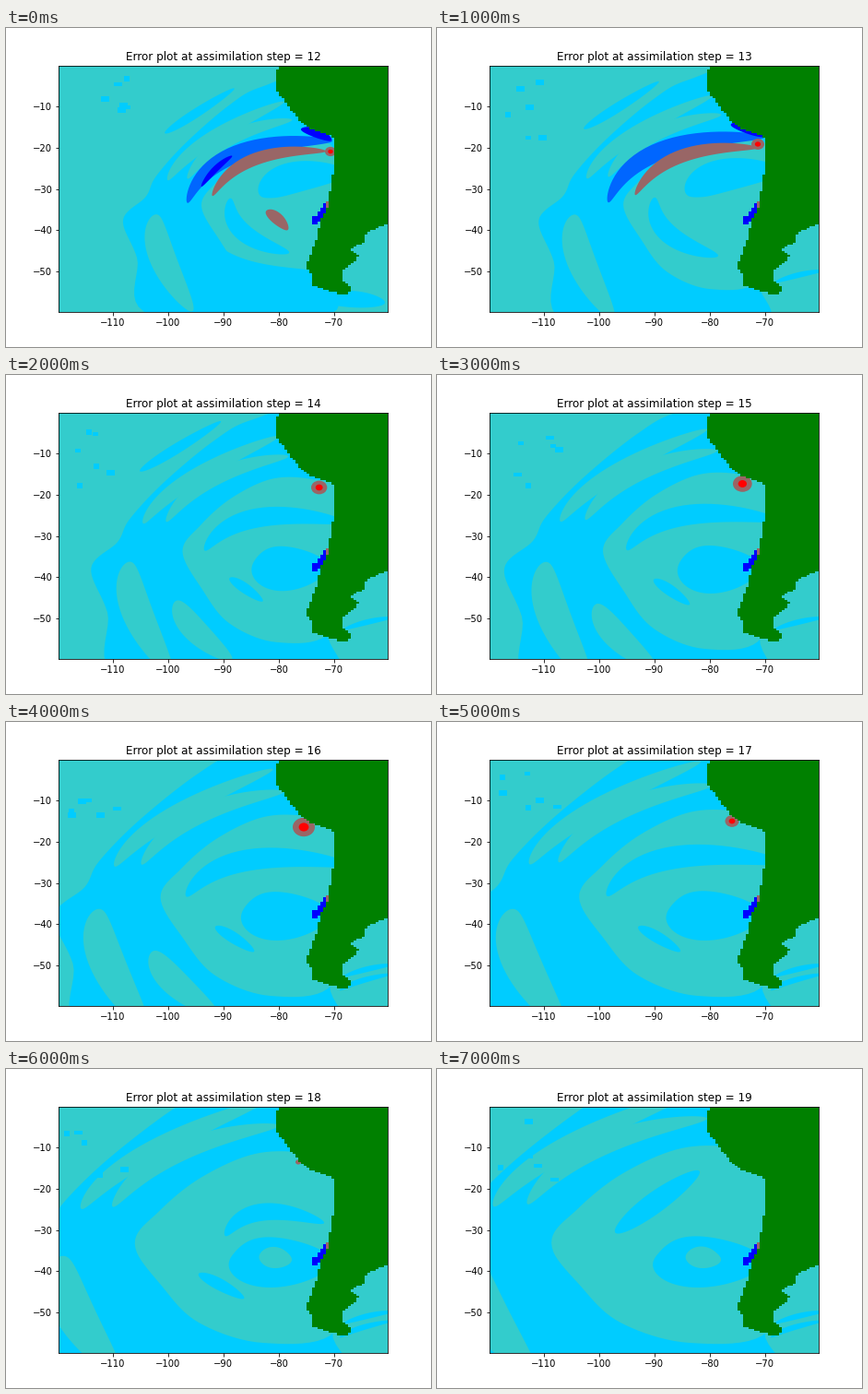
A matplotlib script that plays this animation: 461 by 346 pixels, repeating every 8000 ms.

```python
import matplotlib.pyplot as plt
import numpy as np
from matplotlib.animation import FuncAnimation
from matplotlib.colors import ListedColormap
from matplotlib.patches import Ellipse, Polygon
from matplotlib.path import Path

W, H = 461, 346
LEFT, RIGHT, TOP, BOTTOM = 57.3, 414.4, 41.45, 307.6
TEAL, CYAN, BLUE, NAVY = "#33cccc", "#00ccff", "#0066ff", "#0000ff"
BROWN, RED, LAND = "#996666", "#ff0000", "#008000"
FIRST, LAST, REF = 12, 19, 15
SOURCE = np.array([335, 200])  # the waves spread from here
GROWTH = 1.08                  # spread per step

fig = plt.figure(figsize=(6.4028, 4.8056), dpi=72)
ax = fig.add_axes([LEFT / W, 1 - BOTTOM / H, (RIGHT - LEFT) / W, (BOTTOM - TOP) / H])
ax.set_facecolor(TEAL)
ax.set(xlim=(-119.75, -60.25), ylim=(-59.75, -0.25))
ax.set_xticks(range(-110, -60, 10))
ax.set_yticks(range(-50, 0, 10))
title = ax.set_title("")
shapes = []


def degrees(xy):
    """Stage pixels to longitude and latitude."""
    x, y = np.asarray(xy, float).T
    return np.c_[-119.75 + 59.5 * (x - LEFT) / (RIGHT - LEFT),
                 -0.25 - 59.5 * (y - TOP) / (BOTTOM - TOP)]


def spread(xy, step):
    """Carry an outline from the reference step to another one."""
    s = GROWTH ** (step - REF)
    d = xy - SOURCE
    rise = np.where(d[:, 1] < 0, s ** 0.7, min(s, 1))
    return SOURCE + np.c_[d[:, 0] * s, d[:, 1] * rise]


def add(color, outline, first, last, moving):
    patch = ax.add_patch(Polygon(degrees(outline), fc=color, lw=0, zorder=1 + len(shapes) / 100))
    shapes.append((patch, outline, first, last, moving))


def blob(color, *points, first=FIRST, last=LAST):
    """Smooth closed curve through a few points."""
    p = np.array(points, float)
    q, before, after = np.roll(p, -1, 0), np.roll(p, 1, 0), np.roll(p, -2, 0)
    t = np.linspace(0, 1, 10, endpoint=False)[:, None, None]
    a, b = p + (q - before) / 6, q - (after - p) / 6
    curve = p * (1 - t) ** 3 + 3 * a * t * (1 - t) ** 2 + 3 * b * t**2 * (1 - t) + q * t**3
    add(color, curve.swapaxes(0, 1).reshape(-1, 2), first, last, True)


def band(color, half, start, mid, end, first=FIRST, last=LAST, moving=True):
    """Curved stroke with rounded, tapering ends."""
    t = (1 - np.cos(np.linspace(0, np.pi, 40))[:, None]) / 2
    spine = ((1 - t) * (1 - 2 * t) * np.array(start) + 4 * t * (1 - t) * np.array(mid)
             + t * (2 * t - 1) * np.array(end))
    along = np.gradient(spine, axis=0)
    normal = np.c_[-along[:, 1], along[:, 0]] / np.hypot(*along.T)[:, None]
    offset = normal * half * np.sqrt(np.abs(np.sin(np.pi * t)))
    add(color, np.vstack([spine + offset, (spine - offset)[::-1]]), first, last, moving)


def cells(color, *points, zorder):
    """Half-degree grid cells inside an outline."""
    lon, lat = np.arange(-119.75, -60, 0.5), np.arange(-59.75, 0, 0.5)
    grid = np.stack(np.meshgrid(lon, lat), -1)
    inside = Path(degrees(points)).contains_points(grid.reshape(-1, 2)).reshape(grid.shape[:2])
    ax.pcolormesh(lon, lat, np.ma.masked_equal(inside.astype(int), 0),
                  cmap=ListedColormap([color]), zorder=zorder)


# Outer waves
blob(CYAN, (73, 210), (104, 180), (118, 154), (158, 112), (217, 64), (262, 40), (345, 25),
     (362, 130), (360, 200), (350, 285), (350, 340), (112, 340), (92, 262))
band(CYAN, 6, (130, 99), (170, 75), (225, 42), last=14)
band(TEAL, 9, (134, 159), (187, 110), (293, 59))
band(TEAL, 9, (161, 157), (215, 108), (304, 82))
band(TEAL, 18, (120, 203), (125, 257), (168, 335))
band(TEAL, 14, (174, 248), (192, 280), (238, 318), first=14, last=16)

# Inner wave and what opens inside it
blob(TEAL, (180, 191), (201, 161), (237, 130), (284, 108), (330, 108), (362, 122), (362, 200),
     (352, 285), (290, 297), (235, 275), (203, 235))
band(CYAN, 20, (262, 180), (300, 157), (380, 150), last=13)
band(CYAN, 12, (220, 182), (236, 226), (300, 255), last=13)
band(CYAN, 20, (190, 240), (240, 285), (345, 285), last=12)
band(CYAN, 11, (206, 190), (265, 153), (372, 158), first=14, last=17)
band(CYAN, 26, (262, 206), (296, 211), (350, 208), first=14)
band(CYAN, 6, (235, 222), (252, 233), (274, 249), first=14, last=18)
band(CYAN, 8, (258, 184), (289, 162), (343, 172), first=18, last=18)
band(CYAN, 9, (231, 182), (262, 156), (298, 128), first=19)
band(TEAL, 11, (287, 203), (300, 205), (315, 208), first=18)

# Strong errors of the first steps
band(BLUE, 11, (161, 188), (224, 127), (359, 109), last=13)
band(BROWN, 8, (195, 179), (251, 133), (350, 122), last=13)
band(NAVY, 4, (180, 167), (199, 145), (222, 128), last=12)
band(NAVY, 6, (316, 94), (338, 99), (358, 108), last=13)
band(BROWN, 8, (268, 199), (283, 208), (298, 224), last=12)

# Waters east of the land
band(CYAN, 9, (335, 293), (375, 294), (411, 298), last=12, moving=False)
band(CYAN, 3, (366, 276), (392, 268), (420, 263), first=13, moving=False)
band(CYAN, 3, (362, 291), (385, 281), (420, 273), first=16, moving=False)

# Specks in the far field
rng = np.random.default_rng(4)
for step in range(FIRST, LAST + 1):
    for x, y in rng.uniform((62, 46), (130, 120), (6, 2)):
        w, h = rng.choice([6, 9]), rng.choice([4, 6])
        add(CYAN, np.array([(x, y), (x + w, y), (x + w, y + h), (x, y + h)]), step, step, False)

# Land and the steady error at its coast
cells(LAND, (297, 38), (293, 50), (293, 68), (304, 81), (317, 99), (329, 108), (356, 119),
      (356, 149), (350, 186), (342, 207), (336, 232), (325, 258), (332, 268), (332, 278),
      (345, 284), (371, 290), (375, 281), (366, 274), (366, 262), (383, 248), (372, 240),
      (387, 233), (390, 223), (416, 211), (416, 38), zorder=2)
cells(NAVY, (331, 206), (338, 202), (347, 188), (351, 190), (346, 200), (339, 211), (331, 214),
      zorder=2.2)
cells(BROWN, (346, 187), (351, 187), (351, 194), (346, 194), zorder=2.2)

hot = [ax.add_patch(Ellipse((0, 0), 1, 1, fc=c, lw=0, zorder=1.8)) for c in (BROWN, RED)]


def draw(frame):
    now = FIRST + frame
    for patch, outline, first, last, moving in shapes:
        patch.set_visible(first <= now <= last)
        if moving:
            patch.set_xy(degrees(spread(outline, now)))
    # The hot spot climbs the coast, swells and fades.
    x, y, r = (np.interp(now, (12, 13, 16, 18, 19), v) for v in (
        (352, 348, 323, 317, 317), (134, 126, 114, 101, 101), (6, 7, 12, 3, 0)))
    for patch, size in zip(hot, (r, 0.45 * r if r > 5 else 0)):
        patch.set(center=degrees([(x, y)])[0], width=size / 3, height=size * 0.38)
    title.set_text(f"Error plot at assimilation step = {now}")


anim = FuncAnimation(fig, draw, frames=LAST - FIRST + 1, interval=1000, repeat=True,
                     repeat_delay=0)
plt.show()
```
